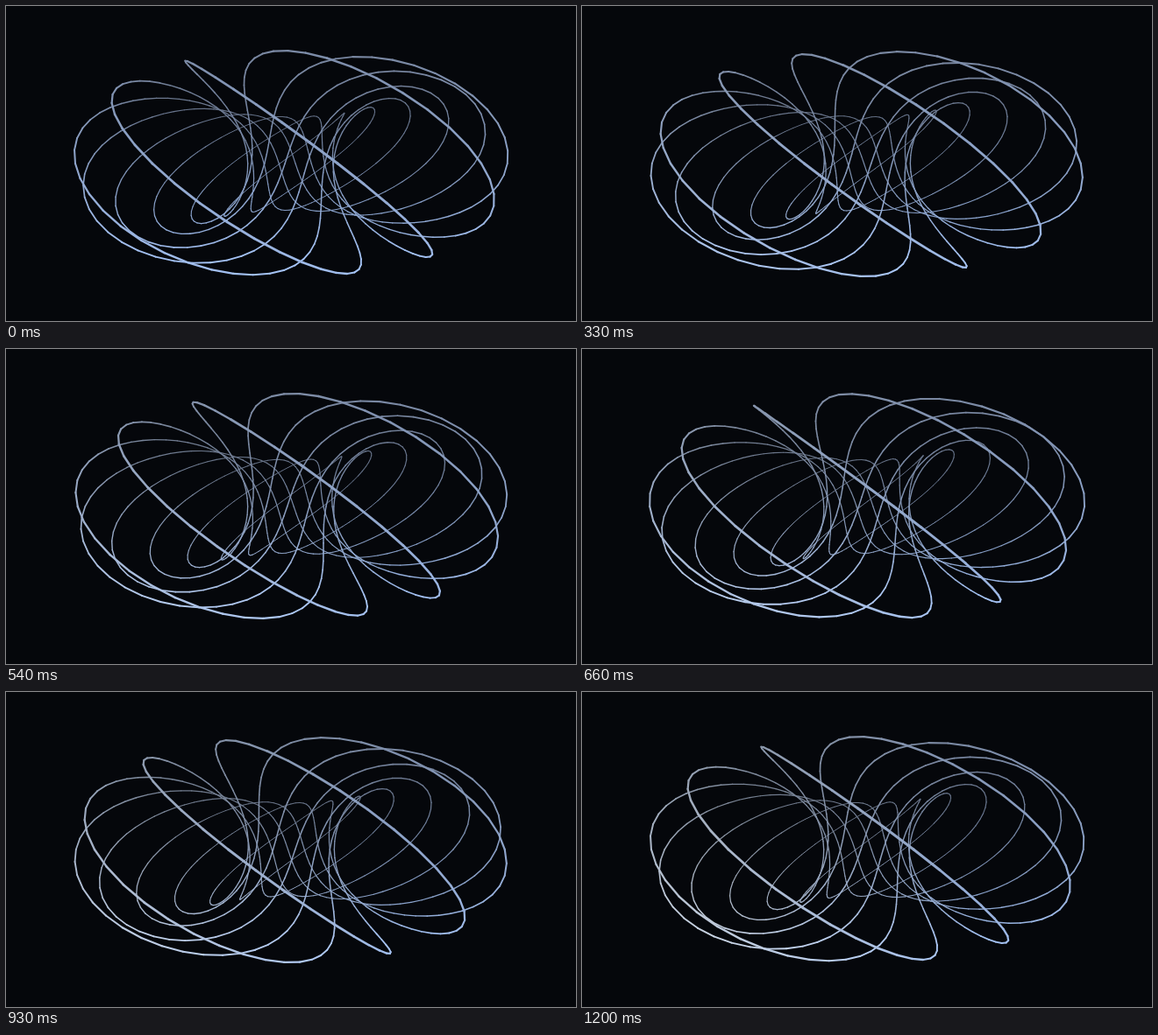
An HTML page with a canvas for the animation above (1230 ms loop, 650x360 px).

```html
<!DOCTYPE html>
<html lang="en">
<head>
<meta charset="utf-8">
<title>Coiled torus</title>
<style>
  html, body { margin: 0; width: 650px; height: 360px; overflow: hidden; background: #05070b; }
  canvas { display: block; }
</style>
</head>
<body>
<canvas id="stage" width="650" height="360"></canvas>
<script>
const ctx = document.getElementById('stage').getContext('2d');
const WIDTH = 650, HEIGHT = 360;
const LOOP = 1230, STEP = 30, STEPS_PER_TURN = 20;

// Torus with major radius 1, seen in perspective along its equator.
const TUBE = 0.6, DISTANCE = 2.58, FOCAL = 314.5;
const RINGS = 7, SEGMENTS = 100;
const SPACING = Math.PI / RINGS;
const START = 6 * Math.PI / 180;

const BACKGROUND = [5, 7, 11];
const TOP = [120, 134, 160];
const BOTTOM = [165, 195, 245];
const PALE_TOP = [138, 150, 168];
const PALE_BOTTOM = [208, 218, 232];

const mix = (a, b, t) => a.map((v, i) => v + (b[i] - v) * t);
const clamp = t => Math.max(0, Math.min(1, t));

// Each ring winds twice around the tube during one trip round the axis.
function pointOn(offset, v) {
  const u = offset - v / 2;
  const radius = 1 + TUBE * Math.cos(v);
  const depth = DISTANCE - radius * Math.cos(u);
  const scale = FOCAL / depth;
  return {
    x: WIDTH / 2 + radius * Math.sin(u) * scale,
    y: HEIGHT / 2 - TUBE * Math.sin(v) * scale,
    depth,
    height: Math.sin(v)
  };
}

function buildSegments(turn) {
  const segments = [];
  for (let ring = 0; ring < RINGS; ring++) {
    const offset = START + (2 * ring - turn) * SPACING;
    let a = pointOn(offset, 0);
    for (let i = 1; i <= SEGMENTS; i++) {
      const b = pointOn(offset, i / SEGMENTS * 4 * Math.PI);
      segments.push({
        a, b,
        depth: (a.depth + b.depth) / 2,
        height: (a.height + b.height) / 2
      });
      a = b;
    }
  }
  return segments.sort((p, q) => q.depth - p.depth);
}

// The left side slowly turns paler over the loop.
function tintAt(x, height, progress) {
  const pale = clamp((450 - x) / 300) * progress;
  const top = mix(TOP, PALE_TOP, pale);
  const bottom = mix(BOTTOM, PALE_BOTTOM, pale);
  return mix(top, bottom, (1 - height) / 2);
}

function draw(turn, progress) {
  ctx.fillStyle = `rgb(${BACKGROUND})`;
  ctx.fillRect(0, 0, WIDTH, HEIGHT);
  ctx.lineCap = 'round';
  for (const { a, b, depth, height } of buildSegments(turn)) {
    const tint = tintAt(a.x, height, progress);
    const strength = Math.min(1, 0.6 + 0.7 / depth);
    ctx.strokeStyle = `rgb(${mix(BACKGROUND, tint, strength).map(Math.round)})`;
    ctx.lineWidth = 0.3 + 2.6 / depth;
    ctx.beginPath();
    ctx.moveTo(a.x, a.y);
    ctx.lineTo(b.x, b.y);
    ctx.stroke();
  }
}

function tick() {
  const step = Math.floor(performance.now() % LOOP / STEP);
  draw(step % STEPS_PER_TURN / STEPS_PER_TURN, step * STEP / LOOP);
  requestAnimationFrame(tick);
}
tick();
</script>
</body>
</html>
```
